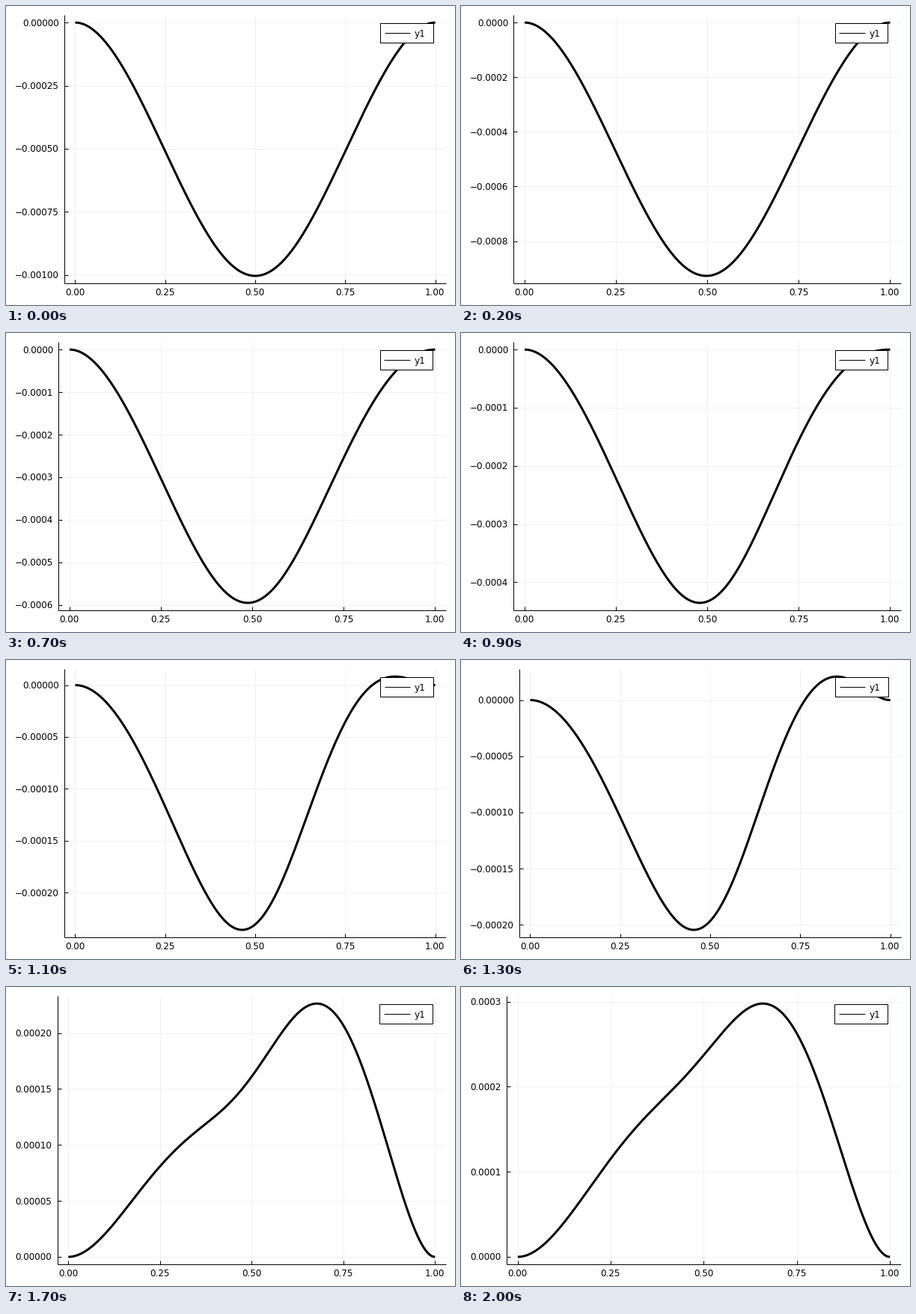
A matplotlib script that plays this animation: 600 px wide and 400 px high, repeating every 2100 ms.

```python
import numpy as np
import matplotlib.pyplot as plt
from matplotlib.animation import FuncAnimation
from matplotlib.patches import Rectangle

W, H, DPI = 600, 400, 100
FRAMES, INTERVAL = 21, 100
TOP, BOTTOM, RIGHT = 12, 371.2, 588
PX = 72 / DPI
EM = 12
WIDEN = 0.03

plt.rcParams["font.family"] = "DejaVu Sans"
fig = plt.figure(figsize=(W / DPI, H / DPI), dpi=DPI, facecolor="white")
ax = fig.add_axes([0, 0, 1, 1])

x = np.linspace(0, 1, 401)


def mode(beta, sigma):
    """Vibration mode of a clamped beam, scaled to a peak of 1."""
    b = beta * x
    phi = np.cosh(b) - np.cos(b) - sigma * (np.sinh(b) - np.sin(b))
    return phi / abs(phi).max()


def patch_load(h):
    """Static shape under a load spread over h either side of midspan."""
    u = x - 0.5
    a, b = u + h, u - h
    cubic = (a * abs(a) ** 3 - b * abs(b) ** 3) / (8 * h)
    shape = 1 - 12 * u**2 - 4 * h**2 + 16 * cubic - 16 * h**2 * u**2
    return shape / shape.max()


# Static shapes, each 1 at midspan
PATCH = patch_load(0.1)
RAMP = 16 * x**2 * (1 - x) ** 2 * (2 + x) / 2.5
MODE1 = mode(4.730041, 0.982502)
MODE2 = mode(7.853205, 1.000777)
OMEGA1 = 1.02
OMEGA2 = OMEGA1 * (7.853205 / 4.730041) ** 2


def deflection(k):
    """Beam under a central load and a growing lift, in millionths."""
    swing = -59.5 * np.sin(OMEGA1 * k) * MODE1 + 1.3 * np.sin(OMEGA2 * k) * MODE2
    return -1004 * PATCH + 65.04 * k * RAMP + swing


def nice_ticks(lo, hi):
    """Best scoring tick step for the span, and the ticks inside it."""
    best = None
    for z in (0, 1, 2, 3):
        for q, nice in ((1, 1), (5, 0.9), (2, 0.7), (2.5, 0.5), (3, 0.2)):
            step = q * 10**z
            first, last = int(np.ceil(lo / step)), int(np.floor(hi / step))
            n = last - first + 1
            if not 4 <= n <= 8:
                continue
            score = (0.25 * (1 - abs(n - 5) / 5) + 0.25 * nice
                     + 0.5 * (hi - lo) / ((n - 1) * step))
            key = (round(score, 6), -n)
            if best is None or key > best[0]:
                best = key, step, np.arange(first, last + 1) * step
    return best[1:]


def tick_labels(step, ticks):
    digits = 6
    while digits > 1 and step % 10 == 0:
        step //= 10
        digits -= 1
    return [f"{t * 1e-6:.{digits}f}".replace("-", "\u2212") for t in ticks]


def advance(s):
    widths = {".": 0.318, "\u2212": 0.788}
    return EM * sum(widths.get(c, 0.636) for c in s)


def line(xs, ys, width=1, **kw):
    kw = {"color": "black", "solid_capstyle": "butt", **kw}
    ax.plot(xs, ys, lw=width * PX, **kw)


def text(px, py, s, ha):
    ax.text(px, py + 4.4, s, ha=ha, va="baseline", fontsize=EM * PX, zorder=6)


def legend(width):
    right = RIGHT - width / 30 - 0.4
    left = right - width / 15 - 36.2
    pad = width / 90
    ax.add_patch(Rectangle((left, 23.2), right - left, 25.6, fc="white",
                           ec="black", lw=PX, zorder=5))
    end = left + pad + width / 15
    line([left + pad, end], [36.2, 36.2], zorder=6)
    text(end + pad, 36.6, "y1", "left")


def draw(k):
    ax.clear()
    ax.set(xlim=(0, W), ylim=(H, 0))
    ax.axis("off")

    w = deflection(k)
    low, high = w.min(), w.max()
    margin = WIDEN * (high - low)
    low, high = low - margin, high + margin
    step, ticks = nice_ticks(low, high)
    labels = tick_labels(step, ticks)

    left = 19 + max(map(advance, labels))
    width = RIGHT - left

    def to_x(v):
        return left + width * (v + WIDEN) / (1 + 2 * WIDEN)

    def to_y(v):
        return BOTTOM - (BOTTOM - TOP) * (v - low) / (high - low)

    grid = dict(alpha=0.06, zorder=1)
    for v in np.arange(5) / 4:
        px = to_x(v)
        line([px, px], [TOP, BOTTOM], **grid)
        line([px, px], [BOTTOM, BOTTOM - 5], zorder=3)
        text(px - 0.3, 382.4, f"{v:.2f}", "center")
    for v, label in zip(ticks, labels):
        py = to_y(v)
        line([left, RIGHT], [py, py], **grid)
        line([left, left + 5], [py, py], zorder=3)
        text(left - 7.4, py, label, "right")

    line([left, left], [TOP, BOTTOM], zorder=3)
    line([left, RIGHT], [BOTTOM, BOTTOM], zorder=3)
    line(to_x(x), to_y(w), 3, zorder=4)
    legend(width)
    return []


anim = FuncAnimation(fig, draw, frames=FRAMES, interval=INTERVAL,
                     init_func=lambda: draw(0), repeat=True, repeat_delay=0)
plt.show()
```
